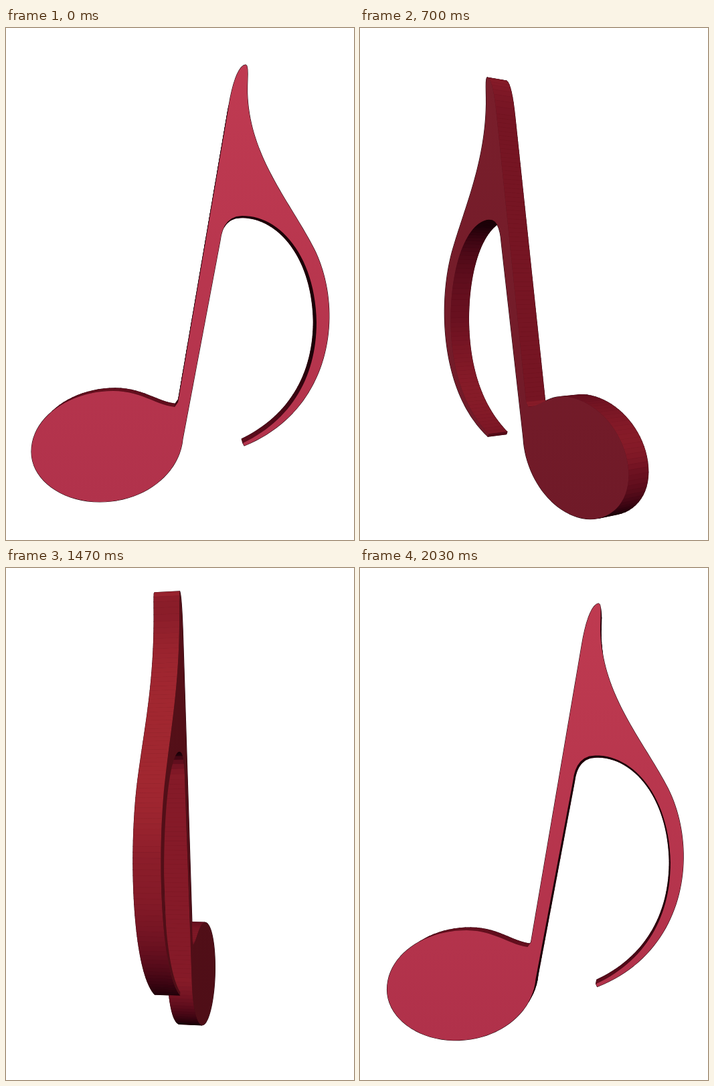
These frames come from a looping animation (520 px wide and 766 px high, 2.1 s). An HTML page with a canvas:

```html
<!DOCTYPE html>
<html lang="en">
<head>
<meta charset="utf-8">
<title>Turning note</title>
<style>
html, body { margin: 0; width: 100%; height: 100%; overflow: hidden; background: #fff; }
canvas { display: block; }
</style>
</head>
<body>
<canvas id="stage" width="520" height="766"></canvas>
<script>
const ctx = document.getElementById('stage').getContext('2d');
const CX = 260.5, CY = 383, DIST = 1380, HALF = 18;
const STEP = 70, STEPS = 30;

// Front face, clockwise from the tip: lines [x, y] and cubic curves [c1, c2, end]
const TIP = [358, 55];
const FLAG = [
  [364, 56, 359, 85, 361, 106],
  [367, 196, 425, 262, 460, 330],
  [505, 420, 490, 570, 356, 625],
  [354, 621],
  [428, 585, 464, 520, 464, 440],
  [462, 340, 408, 280, 353, 281],
  [330, 281, 322, 300, 320, 318]
];
const HEAD = [
  [264, 615],
  [259, 668, 205, 709, 140, 709],
  [84, 709, 38, 676, 38, 634],
  [38, 582, 96, 543, 160, 543],
  [202, 543, 224, 564, 252, 567]
];
const STEM = [[257, 560], [333, 116], [339, 80, 348, 56, ...TIP]];

// Almost even turn, with a slight lead in the first part
function angleAt(n) {
  const lead = 7 * Math.max(0, Math.sin(Math.PI * n / 24));
  return (12.25 * n - 1 + lead) * Math.PI / 180;
}

function outline(segments) {
  const pts = [];
  let [x, y] = TIP;
  for (const seg of segments) {
    const [ex, ey] = seg.slice(-2);
    const [ax, ay, bx, by] = seg.length > 2 ? seg
      : [x + (ex - x) / 3, y + (ey - y) / 3, x + (ex - x) * 2 / 3, y + (ey - y) * 2 / 3];
    const parts = Math.max(2, Math.round(Math.hypot(ex - x, ey - y) / 7));
    for (let i = 0; i < parts; i++) {
      const t = i / parts, u = 1 - t;
      const mix = (p, a, b, q) => u ** 3 * p + 3 * u * u * t * a + 3 * u * t * t * b + t ** 3 * q;
      pts.push([mix(x, ax, bx, ex), mix(y, ay, by, ey)]);
    }
    [x, y] = [ex, ey];
  }
  return pts;
}

// Undo the projection of the starting pose
function toModel([px, py]) {
  const c = Math.cos(angleAt(0)), s = Math.sin(angleAt(0)), p = px - CX;
  const x = (p * (DIST - HALF * c) - HALF * s * DIST) / (DIST * c - p * s);
  const w = HALF * c - x * s;
  return [x, (py - CY) * (DIST - w) / DIST];
}

const shape = outline([...FLAG, ...HEAD, ...STEM]).map(toModel);

function trace(pts) {
  ctx.beginPath();
  for (const p of pts) ctx.lineTo(p.sx, p.sy);
  ctx.closePath();
}

const rgb = (r, g, b) => `rgb(${Math.round(r)},${Math.round(g)},${Math.round(b)})`;

// Lit from the viewer and from above
function sideColor(toward, up) {
  const r = 12 + 130 * Math.max(0, toward) ** 1.4 + (up > 0 ? 90 : 15) * up;
  const v = Math.max(28, Math.min(180, r));
  return rgb(v, v * v * 0.0015, v * 0.3);
}

function capColor(c, top, bottom) {
  const k = Math.abs(c) ** 2.2;
  const tone = m => rgb((80 + 104 * k) * m, (14 + 40 * k) * m * m, (22 + 56 * k) * m);
  const g = ctx.createLinearGradient(0, top, 0, bottom);
  g.addColorStop(0, tone(1.04));
  g.addColorStop(1, tone(0.96));
  return g;
}

function draw(n) {
  const a = angleAt(n), c = Math.cos(a), s = Math.sin(a);
  const project = z => shape.map(([x, y]) => {
    const vx = x * c + z * s, w = z * c - x * s, k = DIST / (DIST - w);
    return { vx, y, w, sx: CX + vx * k, sy: CY + y * k };
  });
  const front = project(HALF), back = project(-HALF);
  const sides = [];

  shape.forEach(([x, y], i) => {
    const j = (i + 1) % shape.length;
    const dx = shape[j][0] - x, dy = shape[j][1] - y, len = Math.hypot(dx, dy);
    const nx = dy / len, ny = -dx / len, toward = -nx * s, p = front[i];
    if (toward * (DIST - p.w) - nx * c * p.vx - ny * p.y <= 0) return;
    sides.push({
      pts: [front[i], front[j], back[j], back[i]],
      w: front[i].w + front[j].w + back[i].w + back[j].w,
      fill: sideColor(toward, -ny)
    });
  });
  sides.sort((p, q) => p.w - q.w);

  const cap = DIST * c > HALF ? front : DIST * c < -HALF ? back : null;

  ctx.fillStyle = '#fff';
  ctx.fillRect(0, 0, 520, 766);
  ctx.lineJoin = 'round';

  // dark rim beneath everything
  ctx.strokeStyle = '#2a0810';
  ctx.lineWidth = 1.2;
  for (const f of sides) { trace(f.pts); ctx.stroke(); }
  if (cap) { trace(cap); ctx.stroke(); }

  ctx.lineWidth = 0.6;
  for (const f of sides) {
    trace(f.pts);
    ctx.fillStyle = ctx.strokeStyle = f.fill;
    ctx.fill();
    ctx.stroke();
  }
  if (cap) {
    const ys = cap.map(p => p.sy);
    trace(cap);
    ctx.fillStyle = capColor(c, Math.min(...ys), Math.max(...ys));
    ctx.fill();
  }
}

const start = performance.now();
let shown = -1;

function tick() {
  const n = Math.floor((performance.now() - start) / STEP) % STEPS;
  if (n !== shown) draw(shown = n);
  requestAnimationFrame(tick);
}
tick();
</script>
</body>
</html>
```
